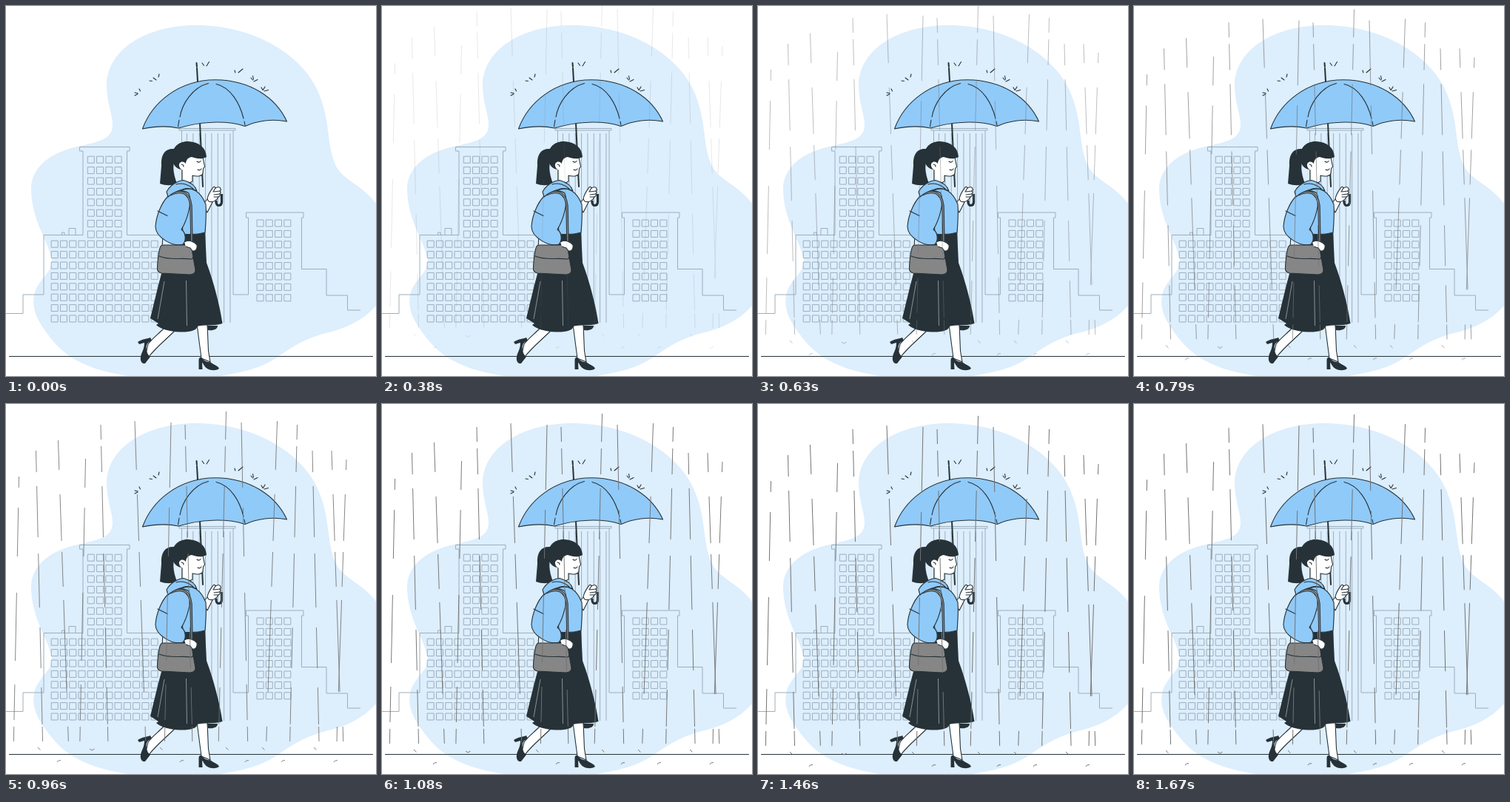
Animation, 500 px wide and 500 px high, one loop 1710 ms. Source, as an HTML page:

```html
<!DOCTYPE html>
<html lang="en">
<head>
<meta charset="utf-8">
<title>Walk in the rain</title>
<style>
  html, body { margin: 0; width: 100%; height: 100%; overflow: hidden; background: #fff; }
  svg { display: block; width: 100vw; height: 100vh; }
  path { stroke-linejoin: round; }
  .city { fill: none; stroke: #9cafbd; stroke-width: 1; }
  .ink { fill: none; stroke: #263238; stroke-width: 1.1; stroke-linecap: round; }
  .thick { stroke-width: 2; }
  .dark { fill: #263238; }
  .blue { fill: #90caf9; stroke: #263238; stroke-width: 1.1; }
  .skin { fill: #fff; stroke: #263238; stroke-width: 1.1; }
  .bag { fill: #868686; stroke: #263238; stroke-width: 1.1; }
  .rain { fill: none; stroke: #737373; stroke-width: 1; animation: fall 1710ms linear infinite; }
  @keyframes fall {
    0%, 1.754% {
      opacity: 0; transform: translateY(-30.8px);
      animation-timing-function: cubic-bezier(.36, -.01, .5, 1.38);
    }
    97.661%, 100% { opacity: 1; transform: translateY(-.8px); }
  }
</style>
</head>
<body>
<svg viewBox="0 0 500 500">
  <path fill="#ddeefd" d="M136 107C137 58 190 26 258 26C330 26 396 62 420 112C440 154 432 190 447 218C457 236 484 244 500 267V405C482 426 455 437 432 442C402 450 385 462 366 475C343 490 320 495 290 500H165C120 493 86 480 64 453C45 430 34 412 38 391C42 370 62 362 62 344C60 322 34 291 34 247C34 216 64 197 95 190.500C122 184 144 181 144 161C144 146 136 130 136 107Z"/>

  <g class="city">
    <path d="M0 415.5H23V390H51V309.500H104V196H99.500V190.500H167V196H163.500V309.500H211M75.500 309V306H79V309M85 309V300.500H94V309"/>
    <path d="M307 168V390H327.500V286H324.500V279H402V286H399.500V355.500H433V391H461.500V411H479"/>
    <path d="M234 168V165.500H310V168ZM237.500 168V430"/>
    <path id="flutes"/>
    <path id="windows"/>
  </g>
  <path class="ink" d="M4.500 473.500H495.500"/>

  <!-- umbrella -->
  <path class="ink thick" d="M257.500 77L257.900 82M258 84L259 102M262 158L266 244"/>
  <path class="blue" d="M184.500 166C197 131 233 100 283 99.700C330 100 365 124 379.500 156C360 152 339 155 323 162.500C297 154 262 156 233 165C215 161 199 163 184.500 166Z"/>
  <path class="ink" d="M273.500 104.500C252 110 238 132 235 150M234 154L232.500 163M284 105.500C304 110 316 132 321 152M322 156L323 161"/>
  <path class="ink" d="M174 117l4 1M174 121l4-2M180 112l1.500 3M194 101l3.500 .5M199 97l4 3M207 92l-1 4M265 77l2.500 3.500M274.500 75.500l-3.500 5.500M309 87l.8 3M314 90l6-5M331 97l2.500 3M333.500 94.500l1 4.500M335 102l5-2.500M345 110l2 3.500M350 109l-2.500 4.500M349 115l5.500-1.500"/>

  <!-- legs and shoes -->
  <path class="skin" d="M214 435C205 444 196 451 192 457L189 470L193 474C202 462 217 450 229 438ZM258 430L264 476L276 481L273.500 466L272 430Z"/>
  <path class="dark" d="M178 454C184 450 190 450 195 448L197 452L192 455C188 459 190 467 192 471L195 474L188 483C184 484 181 480 182 474C183 468 187 464 187 455L180 457ZM260.500 491V480C260 476 262 474 264 475C268 480 273 482 276 481C280 485 287 486 288 490C284 493 277 493 272 490C268 488 267 483 265 482L265.500 491ZM272 432H286C286 437 280 439 273 438Z"/>

  <!-- skirt -->
  <path class="dark" d="M240 309L269 306L271 347C281 374 289 405 292.500 429C280 433 267 430 258 433C259 438 248 441 235 440.500C220 440 208 436 203 431L206 429L195 422C200 401 205 380 211 358Z"/>
  <path fill="none" stroke="#8b9194" d="M214 372L205 423M243.500 371L244.500 432"/>

  <!-- jacket -->
  <path class="skin" d="M266 268L274 259L280 263L272 279Z"/>
  <path class="blue" d="M236 250C252 241 264 253 270 268C271 281 270 294 269 306C259 309 249 309 239 308Z"/>
  <path class="ink" d="M212 310L211 326"/>
  <path class="blue" d="M219 257C226 249 240 248 247 253C252 265 245 289 237 302C243 306 244 317 239 322C226 326 202 313 202 298C203 283 210 266 219 257Z"/>
  <path class="ink" d="M205 277L218 283.500"/>
  <path fill="none" stroke="#263238" stroke-width="3.400" d="M222 255C236 248 248 251 250 270L251 320"/>
  <path fill="none" stroke="#868686" stroke-width="1.400" d="M222 255C236 248 248 251 250 270L251 320"/>

  <!-- bag -->
  <path class="bag" d="M213 323H242C248 323 250 325 251 328L256 357C256 361 253 363 248 363L210 361C205 360 204 357 204.500 353C205 344 206 334 208 327Q209 323 213 323Z"/>
  <path class="ink" d="M207 338C220 344 237 340 250 342Q253 342 253 339"/>
  <path class="skin" d="M241 319C247 315 255 319 258 323C259 328 256 332 252 331L249 327L243 325"/>

  <!-- head -->
  <path class="dark" d="M228 193C215 192 209 200 210 216L208 240C216 243 224 243 231 240C226 226 224 214 230 204Z"/>
  <path class="skin" d="M238 219V238Q246 241 252 237V229C259 231 265 230 266 226L266.500 220L268.500 217L266 205L262 197H237Z"/>
  <path class="dark" d="M225 208C222 191 234 182 247 183C262 184 270 192 271 204C264 208 256 206 251 204C245 205 243 209 243 214L237 221C230 220 226 215 225 208Z"/>
  <path fill="#fff" d="M243 213C239 208 233 211 234 216C235 221 240 223 243 221Z"/>
  <path class="ink" d="M258 210q3 2.500 5-.5M259 221q3 2 5-1M237 214q3 0 3 3"/>
  <path class="blue" d="M217 251C222 242 232 236 240 235.500C249 238 256 243 258 250C251 246 244 246 238 248C231 250 224 253 219 258Z"/>
  <path class="ink" d="M230 241C238 238 248 242 253 247"/>

  <!-- raised hand and handle -->
  <path fill="none" stroke="#263238" stroke-width="3.200" d="M291.500 254V265C291 271 284 271 284 265V263"/>
  <path class="skin" d="M272 261C273 254 277 249 280 245Q282 243 283 246Q289 243 290 247Q291 249 289 250Q291 252 289 254Q290 257 287 258C285 263 279 266 274 264Z"/>
  <path class="ink" d="M283 246l-3 5M281 251l8-1M281 255l8-1M281 258l6 0"/>

  <g class="rain"><path id="drops"/></g>
</svg>
<script>
  const GROUND = 461;

  // Streaks in a column share one rhythm, measured from the top of the stage.
  const rhythms = {
    light: { drift: .020, dash: "0 30 88 27 66 49 92 32 48 9 20 99" },
    even:  { drift: .023, dash: "0 15 38 9 35 19 69 22 73 27 55 26 50 3 20 99" },
    heavy: { drift: .034, dash: "0 28 66 33 63 15 47 18 124 47 20 99" }
  };

  const addColumn = (kind, lean, x, top, bottom = GROUND) => {
    const { drift, dash } = rhythms[kind];
    const p = document.createElementNS("http://www.w3.org/2000/svg", "path");
    p.setAttribute("d", `M${x} ${top}L${x + lean * drift * (bottom - top)} ${bottom}`);
    p.setAttribute("stroke-dasharray", dash);
    p.setAttribute("stroke-dashoffset", top);
    document.querySelector(".rain").append(p);
  };

  const range = n => [...Array(n).keys()];
  const draw = (id, d) => document.getElementById(id).setAttribute("d", d);
  const stamp = (xs, y, mark) => xs.map(x => `M${x} ${y}${mark}`).join("");
  const grid = (x, y, cols, rows) => range(rows).map(r =>
    stamp(range(cols).map(c => x + c * 12.27), y + r * 14.4, "h9v9h-9z")).join("");

  addColumn("light", -1, 17.5, 103);
  addColumn("even", 1, 40.5, 68);
  addColumn("heavy", 1, 70.5, 54);
  addColumn("light", -1, 107.5, 79);
  addColumn("even", 1, 128, 33);
  addColumn("heavy", 1, 174, 28);
  addColumn("light", -1, 223, 30);
  addColumn("even", 1, 242, 33);
  addColumn("even", -1, 297.5, 15);
  addColumn("light", 1, 318, 30);
  addColumn("heavy", -1, 366.5, 28);
  addColumn("even", -1, 393.5, 33);
  addColumn("even", 1, 414, 68);
  addColumn("heavy", 1, 440, 68, 394);
  addColumn("heavy", -1, 460, 80, 394);
  addColumn("light", -1, 447.5, 441);
  addColumn("heavy", 1, 455, 437);

  draw("flutes", stamp(range(8).map(i => 244.5 + i * 8.35), 172, "V428"));
  draw("windows", grid(110.3, 203.2, 4, 8) + grid(61.2, 317.2, 12, 8) + grid(339, 289, 4, 8));
  draw("drops",
    stamp([43, 208, 297, 346, 416], 469, "l3.500 3.500") +
    stamp([113], 471, "l3 2l3.500-2") +
    stamp([69, 235, 323, 372, 443], 489, "q1-3 5-2.500"));
</script>
</body>
</html>
```
